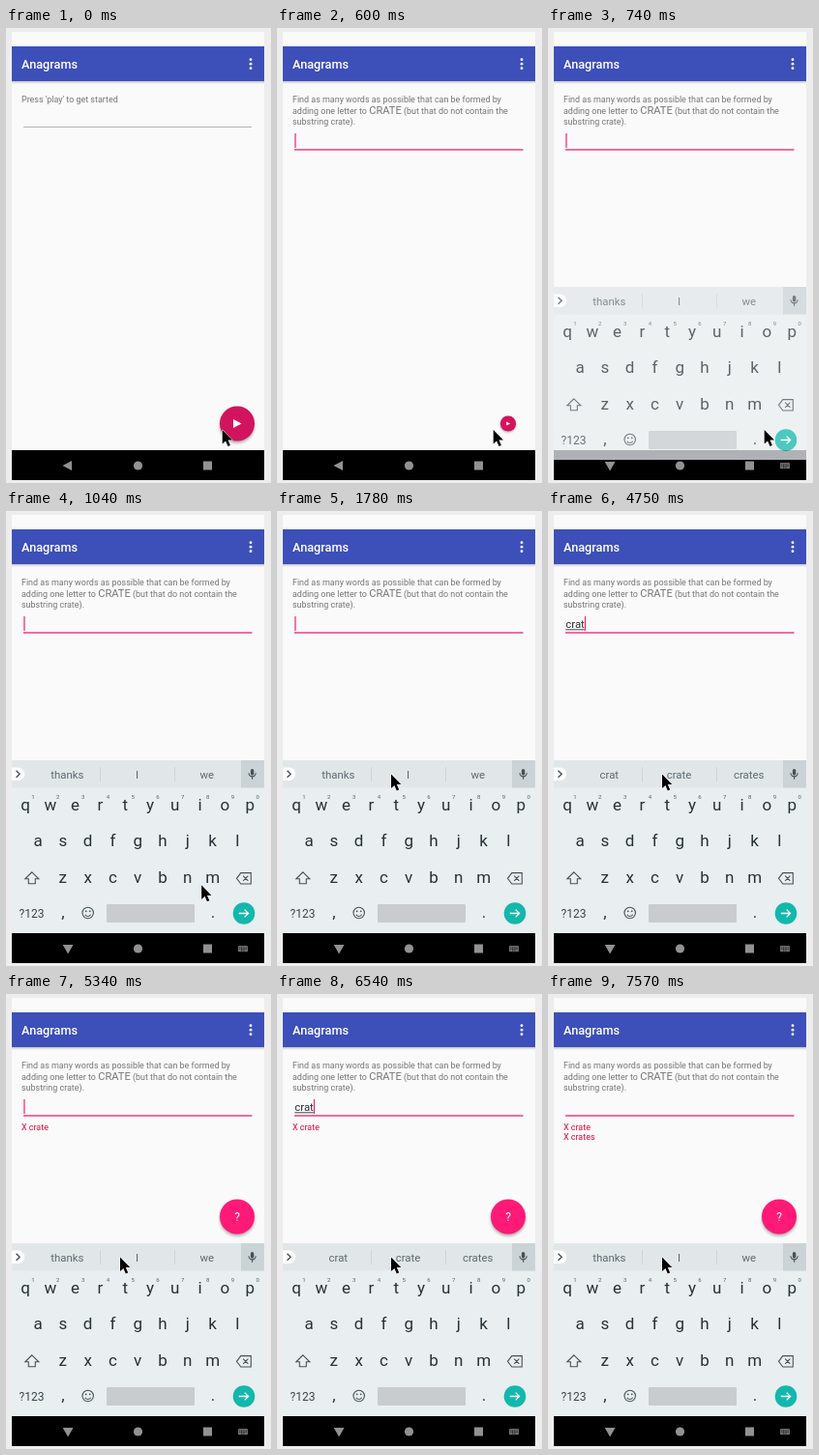
An HTML page for the animation above (8 s loop, 274x471 px).

```html
<!DOCTYPE html>
<html lang="en">
<head>
<meta charset="utf-8">
<title>Anagrams</title>
<style>
html, body { margin: 0; width: 100%; height: 100%; overflow: hidden; background: #ededed; }
svg { display: block; width: 274px; height: 471px; font-family: Roboto, sans-serif; }
text { white-space: pre; }
.mid { text-anchor: middle; }
.hint { font-size: 8.95px; fill: #757575; }
.miss { font-size: 8.95px; fill: #dc0a3c; }
.key { font-size: 17px; fill: #263238; }
.digit { font-size: 6px; fill: #546068; }
.word { font-size: 11.4px; fill: #5d6970; }
.line { fill: none; stroke: #455259; stroke-width: 1.1; }
</style>
</head>
<body>
<svg viewBox="0 0 274 471">
  <defs>
    <filter id="soft" x="-40%" y="-40%" width="180%" height="180%"><feGaussianBlur stdDeviation="1.8"/></filter>
    <linearGradient id="drop" x2="0" y2="1">
      <stop stop-color="#000" stop-opacity=".22"/><stop offset="1" stop-color="#000" stop-opacity="0"/>
    </linearGradient>
  </defs>
  <rect width="274" height="471" fill="#ededed"/>
  <rect x="6" y="4" width="261" height="434" fill="#fafafa"/>
  <rect x="6" y="55" width="261" height="3" fill="url(#drop)"/>
  <rect x="6" y="19" width="261" height="36" fill="#3d4fb8"/>
  <text x="16" y="42" font-size="12.7" font-weight="500" fill="#fff">Anagrams</text>
  <g fill="#fff"><circle cx="253" cy="32.7" r="1.4"/><circle cx="253" cy="37.2" r="1.4"/><circle cx="253" cy="41.7" r="1.4"/></g>

  <g id="intro">
    <text class="hint" x="16" y="76.5">Press 'play' to get started</text>
    <rect x="18" y="102" width="236" height="1" fill="#b4b4b4"/>
  </g>
  <g id="game">
    <text class="hint" x="16" y="76.5">Find as many words as possible that can be formed by</text>
    <text class="hint" x="16" y="89">adding one letter to <tspan font-size="11.1">CRATE</tspan> (but that do not contain the</text>
    <text class="hint" x="16" y="100">substring crate).</text>
    <text id="entry" x="18.3" y="121" font-size="11.4" fill="#2b2b2b"></text>
    <rect id="under" x="18.3" y="122.3" height="1" fill="#444"/>
    <rect id="caret" x="18.3" y="109" width="1.3" height="15" fill="#f0307c"/>
    <rect x="18" y="125.3" width="236.5" height="1.4" fill="#ee2f7b"/>
    <text class="miss" x="16" y="141">X crate</text>
    <text class="miss" x="16" y="151.3">X crates</text>
  </g>

  <g id="fab">
    <circle cy="2" r="18" fill="#000" opacity=".32" filter="url(#soft)"/>
    <circle id="disc" r="18"/>
    <path id="play" d="M-4-4.6L4.6 0L-4 4.6Z" fill="#fff"/>
    <text id="ask" class="mid" y="4.3" font-size="12" fill="#fff">?</text>
  </g>

  <rect x="6" y="437" width="261" height="31" fill="#000"/>
  <g id="keyboard">
    <rect x="6" y="258" width="261" height="179" fill="#e9eef0"/>
    <rect x="6" y="258" width="261" height="28.5" fill="#e1e7e9"/>
    <rect x="243" y="258" width="24" height="28.5" fill="#cbd3d6"/>
    <path d="M97.5 265v15M174.5 265v15" stroke="#cdd5d8"/>
    <path d="M6 265.5h6.5a6.7 6.7 0 0 1 0 13.4H6Z" fill="#fff"/>
    <path class="line" d="M10.5 268.8l3.6 3.5l-3.6 3.5" style="stroke-width:1.4"/>
    <rect x="252.9" y="267" width="3.4" height="6.6" rx="1.7" fill="#455259"/>
    <path class="line" d="M251 271.3a3.6 3.6 0 0 0 7.2 0M254.6 275v2.8"/>
    <g id="words"></g>
    <g id="keys"></g>
    <path class="line" d="M26.8 373.8l7 7h-3.5v5h-7v-5h-3.5Z"/>
    <path class="line" d="M242.8 374.6h10.5v11.4h-10.5l-4.3-5.7ZM245.2 377.7l5.2 5.2M250.4 377.7l-5.2 5.2"/>
    <text class="mid" x="26.5" y="420.6" font-size="12" fill="#37444b">?123</text>
    <text class="key mid" x="59" y="420.5">,</text>
    <text class="key mid" x="214" y="420.5">.</text>
    <circle class="line" cx="84.7" cy="416" r="5.7"/>
    <path class="line" d="M81.8 417.7a3.2 3.2 0 0 0 5.8 0"/>
    <circle cx="82.7" cy="414.3" r=".9" fill="#455259"/><circle cx="86.7" cy="414.3" r=".9" fill="#455259"/>
    <rect x="104" y="407" width="91" height="19" rx="1.2" fill="#c8cccf"/>
    <circle cx="246" cy="416.5" r="11.3" fill="#12b8ab"/>
    <path d="M240.8 416.5h9.6M246.7 412.6l3.9 3.9l-3.9 3.9" fill="none" stroke="#fff" stroke-width="1.3"/>
  </g>
  <g fill="#929292">
    <path id="back" d="M58.5 453L68 448v10Z"/>
    <path id="down" d="M58.7 449h10.8L64.1 458.5Z"/>
    <circle cx="136.5" cy="453" r="4.6"/>
    <rect x="204" y="448.5" width="9" height="9"/>
    <g id="switcher" opacity=".75">
      <rect x="240" y="450" width="10" height="6.2" rx=".8"/>
      <path d="M241.3 451.9h7.6M241.3 453.4h7.6M243 455h4" stroke="#000" stroke-width=".7" stroke-dasharray="1 .7"/>
    </g>
  </g>
  <path id="mouse" d="M0 0V14.6L3.4 11.5L5.8 17L8.2 16L5.8 10.6H10.3Z" stroke="#fff" stroke-width="1" paint-order="stroke"/>
</svg>
<script>
const LOOP = 8000;
const $ = id => document.getElementById(id);
const show = (el, on) => el.setAttribute('visibility', on ? 'visible' : 'hidden');
const place = (el, x, y, s = 1) => el.setAttribute('transform', `translate(${x} ${y}) scale(${s})`);

function label(parent, cls, x, y, str = '') {
  const el = document.createElementNS('http://www.w3.org/2000/svg', 'text');
  el.setAttribute('class', cls);
  el.setAttribute('x', x);
  el.setAttribute('y', y);
  el.textContent = str;
  parent.append(el);
  return el;
}

[['qwertyuiop', 20, 309.8], ['asdfghjkl', 33, 347.3], ['zxcvbnm', 58.8, 385]].forEach(([row, x, y], r) => {
  [...row].forEach((ch, i) => {
    const cx = x + i * 25.8;
    label($('keys'), 'key mid', cx, y, ch);
    if (!r) label($('keys'), 'digit mid', cx + 8, 297.8, (i + 1) % 10);
  });
});
const words = [63.3, 135.5, 207.7].map(x => label($('words'), 'word mid', x, 276.6));
const misses = document.querySelectorAll('.miss');

// Each track is a list of [start, value]; a value holds until the next start.
const tracks = {
  entry: [[0, ''], [3560, 'c'], [4300, 'cr'], [4600, 'cra'], [4750, 'crat'], [4890, 'crate'], [5190, ''],
    [5640, 'c'], [6240, 'cr'], [6540, 'crat'], [6680, 'crate'], [6830, 'crates'], [6980, '']],
  hints: [[0, ''], [3560, 'c'], [4300, 'cr'], [4600, 'cra'], [4750, 'crat'], [4890, 'crate'], [5190, ''],
    [5790, 'c'], [6240, 'cr'], [6540, 'crat'], [6680, 'crate'], [6830, 'crates'], [7120, '']],
  caret: [[0, 1], [2070, 0], [2520, 1], [2960, 0], [3560, 1], [4000, 0], [4300, 1], [7570, 0]],
  misses: [[0, 0], [5190, 1], [6980, 2]],
  fab: [[0, 1], [600, 0.45], [740, 0], [5190, 0.5], [5340, 1]],
  keyboard: [[0, 0], [740, 0.75], [890, 1]],
  mouse: [[0, 0], [890, 0.04], [1040, 0.2], [1190, 0.48], [1330, 0.76], [1480, 0.94], [1630, 1]]
};
const suggestions = {
  '': 'thanks I we', c: 'c can I', cr: 'cr cry crazy', cra: 'cra crazy crack',
  crat: 'crat crate crates', crate: 'crate crates crater', crates: 'crates crate creates'
};
const at = (name, t) => tracks[name].findLast(([start]) => start <= t)[1];

function draw(t) {
  const started = t >= 600;
  show($('intro'), !started);
  show($('game'), started);

  const entry = at('entry', t);
  $('entry').textContent = entry;
  const width = entry ? $('entry').getComputedTextLength() : 0;
  $('under').setAttribute('width', width);
  $('caret').setAttribute('x', 18.3 + width);
  show($('caret'), started && at('caret', t));
  misses.forEach((el, i) => show(el, i < at('misses', t)));
  suggestions[at('hints', t)].split(' ').forEach((w, i) => { words[i].textContent = w; });

  const asking = t >= 5190;
  place($('fab'), 239, asking ? 230.5 : 409.5, at('fab', t));
  $('disc').setAttribute('fill', asking ? '#ff1a78' : '#d2145f');
  show($('play'), !asking);
  show($('ask'), asking);

  const shown = at('keyboard', t);
  place($('keyboard'), 0, 40 * (1 - shown));
  $('keyboard').setAttribute('opacity', shown);
  show($('back'), !shown);
  show($('down'), shown);
  show($('switcher'), shown);

  const k = at('mouse', t);
  place($('mouse'), 223.7 - 107.7 * k + (t >= 1780 ? 2 : 0), 416 - 143.5 * k);
}

const origin = performance.now();
function tick() {
  draw((performance.now() - origin) % LOOP);
  requestAnimationFrame(tick);
}
tick();
</script>
</body>
</html>
```
